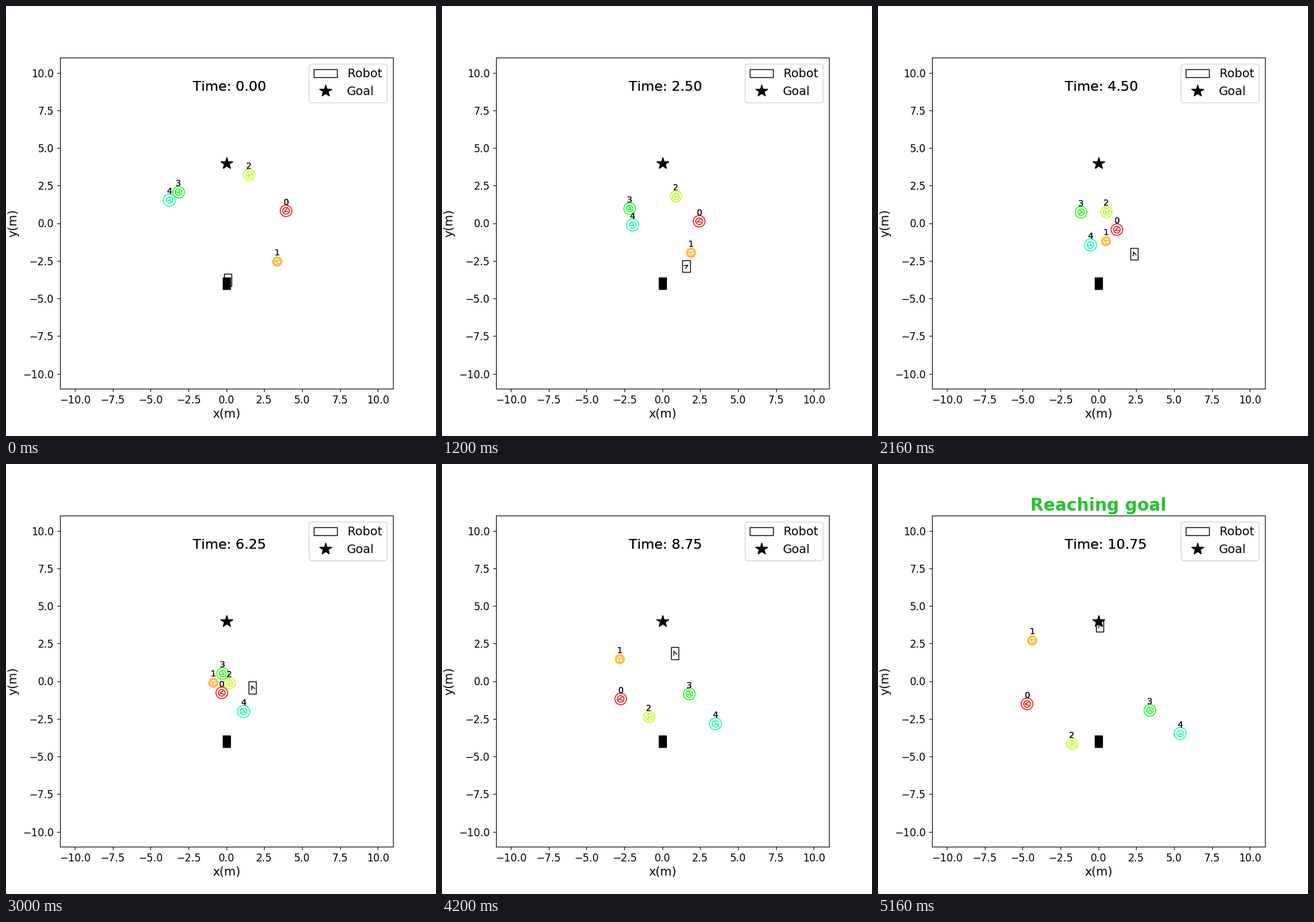
Animation of 700x700 px, one loop 5280 ms. Source, as a matplotlib script:

```python
import matplotlib.pyplot as plt
import numpy as np
from matplotlib.animation import FuncAnimation
from matplotlib.lines import Line2D
from matplotlib.patches import ArrowStyle, Circle, FancyArrowPatch, Rectangle

FRAMES, INTERVAL, STEP = 44, 120, 0.25
ROBOT_SIZE = np.array([0.5, 0.8])
START, GOAL = np.array([0, -4]), np.array([0, 4])
SENSED_RADIUS = 0.22
ARROW_LENGTH = 0.29

# Each path: the steps where the heading bends, as (step, x, y) in metres
ROBOT_PATH = [(0, 0.09, -3.77), (10, 1.57, -2.86), (15, 2.4, -2.47),
              (18, 2.36, -2.04), (43, 0.09, 3.69)]
HUMANS = [
    (0.385, [(0, 3.94, 0.82), (20, 0.92, -0.57), (43, -4.71, -1.51)]),
    (0.3, [(0, 3.36, -2.55), (10, 1.89, -1.97), (18, 0.5, -1.2),
           (43, -4.37, 2.71)]),
    (0.37, [(0, 1.51, 3.22), (10, 0.9, 1.78), (25, 0.21, -0.14),
            (43, -1.73, -4.16)]),
    (0.385, [(0, -3.15, 2.06), (10, -2.16, 0.97), (25, -0.25, 0.51),
             (43, 3.4, -1.94)]),
    (0.4, [(0, -3.76, 1.53), (18, -0.52, -1.45), (43, 5.4, -3.48)]),
]

# Whole-pixel kerning
plt.rcParams["text.kerning_factor"] = 6


def walk(path):
    """Positions and unit headings for every frame, at steady speed per leg."""
    steps, xs, ys = zip(*path)
    k = np.arange(FRAMES)
    pos = np.column_stack([np.interp(k, steps, xs), np.interp(k, steps, ys)])
    way = np.gradient(pos, axis=0)
    return pos, way / np.linalg.norm(way, axis=1, keepdims=True)


def add_text(*args, **kw):
    # Drawn twice for slightly heavier edges
    return ax.add_artist(ax.text(*args, **kw))


class Heading:
    """Small open arrow that shows where an agent is going."""

    def __init__(self, color):
        style = ArrowStyle("->", head_length=4, head_width=2)
        self.patch = ax.add_patch(FancyArrowPatch(
            (0, 0), (1, 1), color=color, arrowstyle=style))

    def move(self, pos, way):
        self.patch.set_positions(pos, pos + ARROW_LENGTH * way)


class Robot:
    def __init__(self, path):
        self.pos, self.way = walk(path)
        self.body = ax.add_patch(Rectangle((0, 0), *ROBOT_SIZE, fill=False,
                                           edgecolor="black"))
        self.heading = Heading("black")

    def move(self, k):
        self.body.set_xy(self.pos[k] - ROBOT_SIZE / 2)
        self.heading.move(self.pos[k], self.way[k])


class Human:
    def __init__(self, name, radius, path, color):
        self.pos, self.way = walk(path)
        self.rings = [ax.add_patch(Circle((0, 0), r, fill=False,
                                          edgecolor=color))
                      for r in (radius, SENSED_RADIUS)]
        self.heading = Heading(color)
        self.label = add_text(0, 0, name, fontsize=10)

    def move(self, k):
        for ring in self.rings:
            ring.center = self.pos[k]
        self.heading.move(self.pos[k], self.way[k])
        self.label.set_position(self.pos[k] + (-0.2, 0.4))


fig, ax = plt.subplots(figsize=(7, 7), dpi=100)
ax.set_xlim(-11, 11)
ax.set_ylim(-11, 11)
ax.tick_params(labelsize=12)
ax.set_xlabel("x(m)", fontsize=14, labelpad=2.5)
ax.set_ylabel("y(m)", fontsize=14)

ax.add_patch(Rectangle(START - ROBOT_SIZE / 2, *ROBOT_SIZE, color="black"))
goal = ax.add_line(Line2D(GOAL[:1], GOAL[1:], color="black", marker="*",
                          linestyle="None", markersize=15))
robot = Robot(ROBOT_PATH)
cmap = plt.get_cmap("hsv", 10)
humans = [Human(str(i), radius, path, cmap(i))
          for i, (radius, path) in enumerate(HUMANS)]

ax.legend([robot.body, goal], ["Robot", "Goal"], fontsize=14,
          loc="upper right")
clock = add_text(0.4, 0.9, "", fontsize=16, transform=ax.transAxes)
title = ax.set_title("", fontsize=20, fontweight="bold", color="#23c42d")


def update(k):
    for agent in [robot, *humans]:
        agent.move(k)
    clock.set_text(f"Time: {k * STEP:.2f}")
    title.set_text("Reaching goal" if k == FRAMES - 1 else "")
    return []


anim = FuncAnimation(fig, update, frames=FRAMES, interval=INTERVAL,
                     repeat=True)
plt.show()
```
